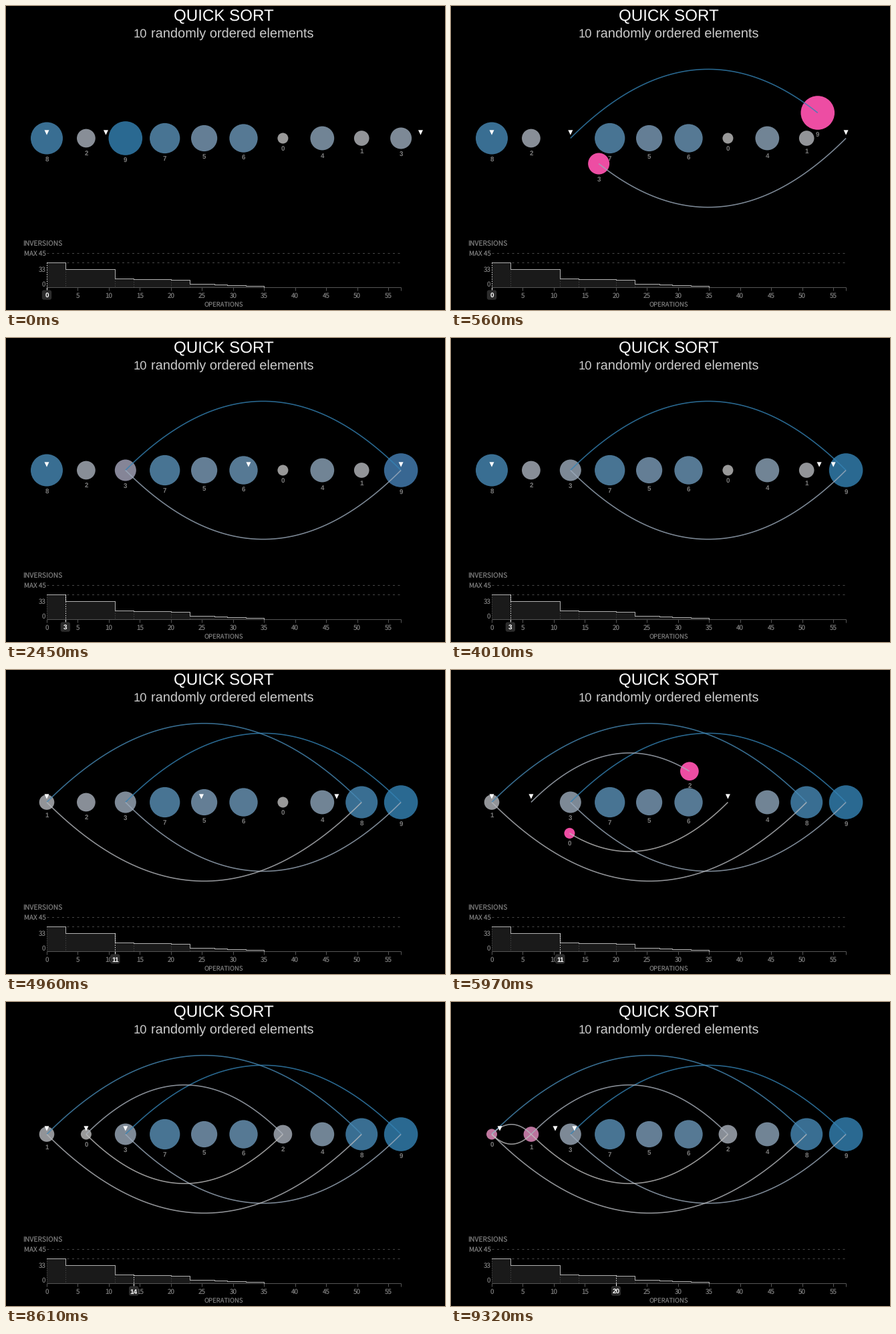
Write a matplotlib script that moves like this. It is 657 px wide and 454 px high and loops after 9470 ms.

```python
import numpy as np
import matplotlib.pyplot as plt
from matplotlib.animation import FuncAnimation
from matplotlib.patches import Circle, FancyBboxPatch, Polygon

plt.rcParams["text.hinting"] = "none"

W, H, DPI = 657, 454, 64
LOOP, FRAMES = 9470, 107

START = [8, 2, 9, 7, 5, 6, 0, 4, 1, 3]
X0, GAP, ROW = 61, 58.9, 197.5
GREY, BLUE = np.array([153, 153, 153]) / 255, np.array([42, 105, 145]) / 255
PINK = np.array([237, 77, 163]) / 255

# (start in ms, kind, slots): a move holds pivot, left and right markers
FIRST_OP = 2
STEPS = [(-182, "move", (0, 2, 9)), (270, "swap", (2, 9))]
STEPS += [(703 + 522 * k, "move", (0, 3 + k, 9)) for k in range(6)]
STEPS += [
    (3835, "move", (0, 9, 8)), (4280, "swap", (0, 8)),
    (4733, "move", (0, 1, 7)), (5220, "move", (0, 1, 6)),
    (5660, "swap", (1, 6)),
]
STEPS += [(6155 + 500 * k, "move", (0, 2, 5 - k)) for k in range(5)]
STEPS += [(8655, "swap", (0, 1)), (9190, "move", (2, 3, 7))]
ENDS = [s[0] for s in STEPS[1:]] + [9690]

# inversions left after each operation that changes the order
OPS = [0, 3, 11, 14, 20, 23, 27, 29, 32, 35]
INVERSIONS = [33, 24, 11, 10, 9, 4, 3, 2, 1, 0]
BASE, OP_W, INV_H = 419.5, 530 / 57, 1.115

HEAD, SMALL = "Liberation Sans", "Noto Sans CJK JP"


def px(v):
    return v * 72 / DPI


def ease(u):
    u = min(max(u, 0), 1)
    return 4 * u**3 if u < 0.5 else 1 - 4 * (1 - u) ** 3


def slot_x(slot):
    return X0 + GAP * slot


def op_x(op):
    return X0 + OP_W * op


def inv_y(n):
    return BASE - INV_H * n


def radius(value):
    return 8 * np.sqrt(1 + value)


def tint(value):
    return GREY + (BLUE - GREY) * (value / 9) ** np.array([1.25, 1, 1])


def arc(a, b, s):
    span = slot_x(b) - slot_x(a)
    return slot_x(a) + span * s, ROW - s * (1 - s) * span


fig = plt.figure(figsize=(W / DPI, H / DPI), dpi=DPI, facecolor="black")
ax = fig.add_axes([0, 0, 1, 1])
ax.set_xlim(0, W)
ax.set_ylim(H, 0)
ax.axis("off")


def text(x, y, s, size, color, ha="center", weight="normal", z=2, font=HEAD):
    return ax.text(x, y, s, fontsize=px(size), color=color, ha=ha, va="baseline",
                   family=font, weight=weight, zorder=z)


def line(xs, ys, color, width=1.0, z=2, **kw):
    return ax.plot(xs, ys, color=color, lw=px(width), zorder=z,
                   solid_capstyle="butt", **kw)[0]


def dots(x, top, color, z=2):
    return line([x, x], [top, BASE], color, z=z, ls=(0, (1.2, 2.2)))


def draw_static():
    text(326, 22.6, "QUICK SORT", 24.1, "white")
    text(191, 47, "10", 18.4, "#cccccc", ha="left")
    text(460.5, 47, "randomly ordered elements", 20, "#cccccc", ha="right")

    dim = "#7a7a7a"
    text(25.5, 359, "INVERSIONS", 10.3, dim, ha="left", font=SMALL)
    text(59.5, 373, "MAX 45", 9.9, dim, ha="right", font=SMALL)
    text(59.5, 396.5, "33", 9.9, dim, ha="right", font=SMALL)
    text(59.5, 418.5, "0", 9.9, dim, ha="right", font=SMALL)
    text(326, 449, "OPERATIONS", 9.5, dim, font=SMALL)

    for n in (45, 33):
        line([X0, 591], [inv_y(n)] * 2, "#484848", ls=(0, (3, 4.5)))
    line([X0, 591], [BASE, BASE], "#555555")
    for op in range(0, 60, 5):
        x = op_x(op)
        text(x, 435.5, str(op), 9.9, dim, font=SMALL)
        line([x, x], [BASE, 425], "#555555")
    line([591, 591], [BASE, 425], "#555555")

    xs = [op_x(op) for op in OPS]
    ys = [inv_y(n) for n in INVERSIONS]
    ax.fill_between(xs, ys, BASE, step="post", color="#1a1a1a", lw=0, zorder=1)
    ax.step(xs, ys, where="post", color="#b0b0b0", lw=px(1), zorder=3)
    for x, y in zip(xs[:6], ys):
        dots(x, y, "#4a4a4a")


draw_static()

balls = [Circle((0, 0), radius(v), lw=0, zorder=4) for v in range(10)]
for ball in balls:
    ax.add_patch(ball)
names = [text(0, 0, str(v), 9.8, "#7d7d7d", weight="bold", z=5) for v in range(10)]
trails = [line([], [], "white", 1.6, z=6, alpha=0.8) for _ in range(8)]
markers = [Polygon([(0, 0)] * 3, color="white", lw=0, zorder=7) for _ in range(3)]
for m in markers:
    ax.add_patch(m)

cursor = dots(X0, inv_y(33), "white", z=4)
cursor_tick = line([X0, X0], [BASE, 425], "white", z=4)
badge = FancyBboxPatch((0, 425.5), 12, 12, boxstyle="round,pad=1.2,rounding_size=3",
                       fc="#2c2c2c", lw=0, zorder=4)
ax.add_patch(badge)
badge_text = text(0, 435.5, "0", 10, "white", weight="bold", z=5)


def swap_heat(t, start, end):
    if t < end:
        return ease((t - start) / 200)
    heat = 1 - ease((t - end) / 285)
    # the first pair keeps a faint blush until the markers have crossed
    return max(heat, 0.07) if start < 1000 and t < 3900 else heat


def state_at(t):
    order, marks, op = list(START), np.array([0.0, 1, 10]), 0
    heat, moving, paths = {}, {}, []
    for k, (start, kind, slots) in enumerate(STEPS):
        if t < start:
            break
        end = ENDS[k]
        e = ease((t - start) / (end - start))
        if kind == "move":
            marks = marks + (np.array(slots) - marks) * e
            continue
        a, b = slots
        va, vb = order[a], order[b]
        paths += [(va, a, b, e), (vb, b, a, e)]
        for v in (va, vb):
            heat[v] = max(heat.get(v, 0), swap_heat(t, start, end))
        if t < end:
            moving = {va: arc(a, b, e), vb: arc(b, a, e)}
        else:
            order[a], order[b] = vb, va
            op = FIRST_OP + k
    places = {v: (slot_x(s), ROW) for s, v in enumerate(order)}
    places.update(moving)
    return places, heat, paths, marks, op


def draw(i):
    t = (i + 0.5) * LOOP / FRAMES
    places, heat, paths, marks, op = state_at(t)

    for v, (x, y) in places.items():
        base = tint(v)
        balls[v].center = (x, y)
        balls[v].set_facecolor(base + (PINK - base) * heat.get(v, 0))
        names[v].set_position((x, y + radius(v) + 11.3))

    for k, trail in enumerate(trails):
        if k < len(paths):
            v, a, b, e = paths[k]
            trail.set_data(*arc(a, b, np.linspace(0, e, 60)))
            trail.set_color(np.minimum(tint(v) * 1.25, 1))
        else:
            trail.set_data([], [])

    for m, slot in zip(markers, marks):
        x = slot_x(slot)
        m.set_xy([(x - 3.5, 185.3), (x + 3.5, 185.3), (x, 192.7)])

    x = op_x(op)
    level = INVERSIONS[max(OPS.index(op) - 1, 0)]
    cursor.set_data([x, x], [inv_y(level), BASE])
    cursor_tick.set_data([x, x], [BASE, 425])
    badge.set_x(x - 6)
    badge_text.set_x(x)
    badge_text.set_text(str(op))
    return []


anim = FuncAnimation(fig, draw, frames=FRAMES, interval=LOOP / FRAMES,
                     init_func=lambda: draw(0), repeat=True, repeat_delay=0)
plt.show()
```
